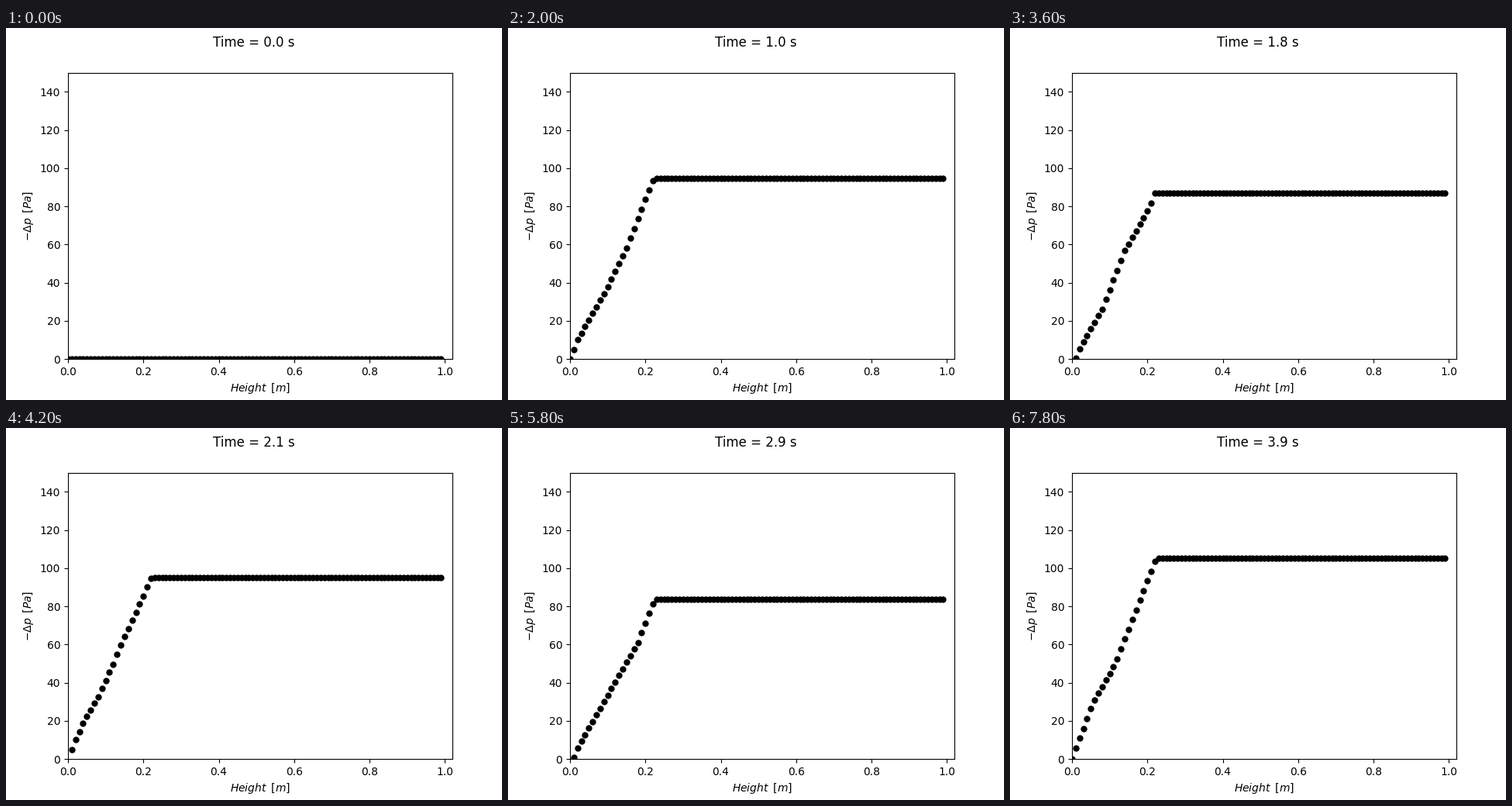
Recreate the animation shown at these times as a matplotlib script. Size 640 px wide and 480 px high, loop 8 s.

```python
import numpy as np
import matplotlib.pyplot as plt
from matplotlib.animation import FuncAnimation

FRAMES = 40
STEP_MS = 200
DT = 0.1

DENSE = 5.1    # pressure gradient in the packed bed, Pa per cm
LOOSE = 3.45   # gradient inside a bubble zone

# Key states: time (s), base offset (Pa), plateau (Pa), bubble zones (cm)
STATES = [
    (0.1, 0, 105, []),
    (0.6, 0, 102, [(2, 10.3)]),
    (1.3, 0, 90, [(2, 15)]),
    (1.8, -4.8, 86.9, [(2, 8), (14, 20.5)]),
    (2.4, 4.8, 102.8, [(4, 12)]),
    (2.9, -4.4, 83.6, [(2, 18)]),
    (3.9, 0.8, 105, [(5.8, 11.5)]),
]

cm = np.arange(100)


def profile(offset, plateau, zones):
    """Pressure drop rises with bed weight, then stays flat above the bed."""
    p = offset + DENSE * cm
    for low, high in zones:
        p = p - (DENSE - LOOSE) * (np.clip(cm, low, high) - low)
    p[0] = min(offset, 0)
    return np.minimum(p, plateau)


times = [state[0] for state in STATES]
profiles = [profile(*state[1:]) for state in STATES]


def pressure(frame):
    """Ease from one key state to the next; no flow yet at the start."""
    if frame == 0:
        return np.zeros(len(cm))
    pos = np.interp(frame * DT, times, range(len(times)))
    i = min(int(pos), len(times) - 2)
    u = pos - i
    u = u * u * (3 - 2 * u)
    return (1 - u) * profiles[i] + u * profiles[i + 1]


fig, ax = plt.subplots(figsize=(6.4, 4.8), dpi=100)
dots, = ax.plot([], [], "ko", markersize=5)
title = fig.suptitle("")
ax.set_xlim(0, 1.02)
ax.set_ylim(0, 150)
ax.set_xlabel(r"$Height\hspace{0.5}[m]$")
ax.set_ylabel(r"$-\Delta p\hspace{0.5}[Pa]$")


def draw(frame):
    dots.set_data(cm / 100, pressure(frame))
    title.set_text(f"Time = {frame * DT:.1f} s")
    return dots, title


anim = FuncAnimation(fig, draw, frames=FRAMES, interval=STEP_MS,
                     init_func=lambda: draw(0), repeat=True, repeat_delay=0)
plt.show()
```
